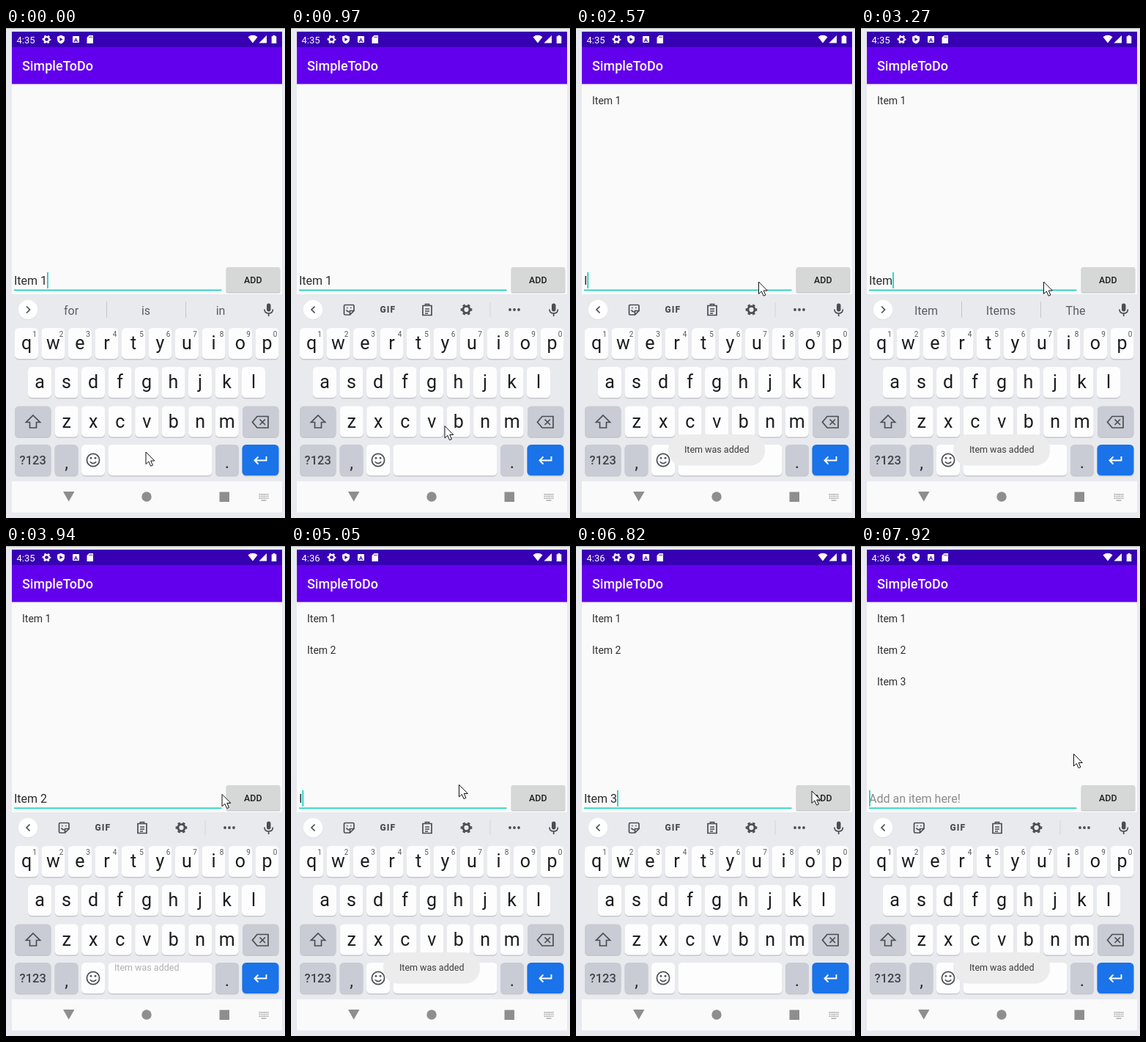
Write an HTML page that moves like this. It is 381 by 668 pixels and loops after 8000 ms.

```html
<!DOCTYPE html>
<html lang="en">
<head>
<meta charset="utf-8">
<title>To-do list demo</title>
<style>
html, body { margin: 0; width: 100%; height: 100%; overflow: hidden; background: #e8eaef; }
svg { display: block; width: 100vw; height: 100vh; }
text { font-family: Roboto, sans-serif; white-space: pre; }
.mid { text-anchor: middle; }
.line { fill: none; stroke: #4a4d51; stroke-width: 1.7; }
</style>
</head>
<body>
<svg id="stage" viewBox="0 0 381 668"></svg>
<script>
const LOOP = 8000;
const BLINK = 510;
const INK = '#4a4d51';
const stage = document.getElementById('stage');

const rect = (x, y, w, h, fill, r = 0, extra = '') =>
  `<rect x="${x}" y="${y}" width="${w}" height="${h}" rx="${r}" fill="${fill}" ${extra}/>`;
const dot = (x, y, r, fill) => `<circle cx="${x}" cy="${y}" r="${r}" fill="${fill}"/>`;
const text = (x, y, size, fill, str, extra = '') =>
  `<text x="${x}" y="${y}" font-size="${size}" fill="${fill}" ${extra}>${str}</text>`;
const path = (d, extra = 'class="line"') => `<path d="${d}" ${extra}/>`;
const at = (x, y, body, extra = '') => `<g transform="translate(${x} ${y})" ${extra}>${body}</g>`;
const fill = color => `fill="${color}"`;

const gear = (x, y, scale, color) => at(x, y,
  `<g transform="scale(${scale})" fill="none" stroke="${color}">
    <circle r="4.7" stroke-width="3"/>
    <circle r="6.9" stroke-width="2.2" pathLength="12" stroke-dasharray="1 1" stroke-dashoffset=".5"/></g>`);

function key(x, y, w, color = '#fdfdfe') {
  return rect(x, y + 1, w, 42.5, '#c6c8cd', 5.5) + rect(x, y, w, 42, color, 5.5);
}

function letterRow(letters, x, y, digits = '') {
  return [...letters].map((c, i) => {
    const cx = x + 36.5 * i;
    const digit = digits ? text(cx + 11, y + 11.5, 10, '#55585c', digits[i], 'class="mid"') : '';
    return key(cx - 16, y, 32) + text(cx, y + 29, 25, '#1c1d1f', c, 'class="mid"') + digit;
  }).join('');
}

function statusBar() {
  return rect(8, 5, 369, 21.5, '#3700b3') +
    text(14.5, 20.5, 13, '#fff', '4:35', 'id="clock"') +
    gear(55.5, 15.5, .74, '#fff') +
    at(75, 15.5, path('M0-5.8L5-3.8V0C5 3 3 5 0 6C-3 5-5 3-5 0V-3.8Z', fill('#fff')) +
      path('M-1.6-2.6L2.6 0L-1.6 2.6Z', fill('#3700b3'))) +
    rect(91, 11, 9, 9, '#fff', 1) +
    text(95.5, 18.5, 8, '#3700b3', 'A', 'class="mid" font-weight="700"') +
    path('M113.5 10H119V21H110.5V13Z', fill('#fff')) +
    path('M114 11.5v2M115.7 11.5v2M117.4 11.5v2', 'stroke="#3700b3" stroke-width=".8"') +
    path('M330.5 12.2Q337 7.5 343.5 12.2L337 20.5Z', fill('#fff')) +
    path('M356 10V20.5H345.5Z', fill('#fff')) +
    path('M364.5 10h3v1.2h1.8v9.8h-6.6v-9.8h1.8Z', fill('#fff'));
}

function appScreen() {
  return rect(8, 76, 369, 287, '#fafafa') + statusBar() +
    rect(8, 26, 369, 50.4, '#6200ee') +
    text(22, 58, 18, '#fff', 'SimpleToDo', 'font-weight="500"') +
    [1, 2, 3].map(n => text(22, 60.5 + 43 * n, 14, '#303030', 'Item ' + n, `id="item${n}"`)).join('') +
    text(11, 350, 16, '#8c8c8c', 'Add an item here!', 'id="hint"') +
    text(11, 350, 16, '#2a2a2a', '', 'id="entry"') +
    rect(11, 356.6, 283.5, 1.6, '#12cdbb') +
    rect(0, 333, 1.7, 22, '#12cfbc', 0, 'id="caret"') +
    rect(300.5, 327, 74, 34.5, '#c9caca', 2) + rect(301, 326, 73, 34, '#d6d7d7', 2, 'id="button"') +
    text(337.3, 347.5, 12.4, '#202020', 'ADD', 'class="mid" font-weight="500"');
}

function toolbar() {
  return path('M32.5 379.5L28 384L32.5 388.5') +
    path('M74 377.5h10.5q1.5 0 1.5 1.5v6.5l-5.5 5.5h-6.5q-1.5 0-1.5-1.5v-10.5q0-1.5 1.5-1.5' +
      'M86 385.5h-5.5v5.5M75.5 384.5q1.5 2.5 4 2.5M76 381.5h1.5M81 381.5h1.5') +
    text(132.3, 388.3, 12, INK, 'GIF', 'class="mid" font-weight="900" letter-spacing="1"') +
    path('M180 378.5h12v13h-12ZM183.5 378.5v-2h5v2M183 383h6M183 386h6M183 389h4') +
    gear(239.5, 384, .98, INK) +
    rect(271.5, 374, 1, 20, '#d2d4d9') +
    [299, 305, 311].map(x => dot(x, 384, 1.9, INK)).join('');
}

function suggestions() {
  return path('M28 379.5L32.5 384L28 388.5') +
    [89, 191, 293].map((x, i) => text(x, 390.5, 16, '#5a5d62', '', `class="mid" id="word${i}"`)).join('') +
    rect(137, 373, 1, 22, '#c3c6cb') + rect(245, 373, 1, 22, '#c3c6cb');
}

function keyboard() {
  const grey = '#c9ccd4';
  return rect(8, 363, 369, 255, '#e8eaee') +
    dot(30, 384.8, 13.3, '#d9dbdf') + dot(30, 384, 13.2, '#fff') +
    `<g id="tools">${toolbar()}</g><g id="words">${suggestions()}</g>` +
    rect(356, 375.5, 5.5, 11, INK, 2.75) +
    path('M353 383.5q0 5.5 5.7 5.5t5.7-5.5M358.7 389v4') +
    letterRow('qwertyuiop', 28, 409, '1234567890') +
    letterRow('asdfghjkl', 46, 462) +
    letterRow('zxcvbnm', 82.7, 515.5) +
    key(12, 515.5, 49.5, grey) + path('M37 528L46.5 537.5H41.5V545H32.5V537.5H27.5Z') +
    key(323, 515.5, 49.5, grey) +
    path('M343 529.5H358V545H343L336.5 537.2ZM346.5 533.5l7.5 7.5M354 533.5l-7.5 7.5') +
    key(12, 568, 49.5, grey) + text(36.7, 595, 16.5, '#404347', '?123', 'class="mid" font-weight="500"') +
    key(66.5, 568, 32, grey) + text(82.5, 600.5, 24, '#2b2d30', ',', 'class="mid"') +
    key(103, 568, 32) + '<circle cx="119" cy="589" r="8.6" class="line"/>' +
    dot(116, 586.3, 1.4, INK) + dot(122, 586.3, 1.4, INK) + path('M114.8 591.3q4.2 4.6 8.4 0') +
    key(139.5, 568, 142) +
    key(286, 568, 32, grey) + text(302, 600, 24, '#2b2d30', '.', 'class="mid"') +
    key(322.5, 568, 50, '#1a73e8') +
    path('M355.5 584V589.5H340M344.5 584.5L339.5 589.5L344.5 594.5', 'fill="none" stroke="#fff" stroke-width="1.9"');
}

function navBar() {
  const grey = '#8e8e8e';
  const dots = [0, 1, 2].map(r => path(`M345.5 ${635.8 + 2.6 * r}h13`,
    'stroke="#a2a2a2" stroke-width="1.4" stroke-dasharray="1.6 .7"')).join('');
  return rect(8, 618, 369, 42.5, '#fafafa') +
    path('M78 632H93.5L85.7 645.5Z', fill(grey)) + dot(192, 639, 6.7, grey) +
    rect(291.5, 632.5, 13.5, 13.5, grey) + dots + path('M348.5 644h7', 'stroke="#a2a2a2" stroke-width="1.3"');
}

stage.innerHTML = rect(0, 0, 381, 668, '#e8eaef') + rect(0, 0, 381, 1, '#b4b5b9') +
  appScreen() + keyboard() + navBar() +
  rect(126, 554, 132, 42.5, '#ececed', 20, 'id="toast"') +
  text(192.2, 579, 12.5, '#3c3c3c', 'Item was added', 'class="mid" id="label"') +
  at(0, 0, path('M0 0V16.5L3.8 13L6.6 19.2L9.4 18L6.7 12H11.8Z',
    'fill="#fff" stroke="#111" stroke-width="1" stroke-linejoin="round"'), 'id="mouse"');

const ui = {};
stage.querySelectorAll('[id]').forEach(el => ui[el.id] = el);

// Each round types "Item n" from start to done, then clicks ADD.
const rounds = [
  { start: -2000, done: 0, click: 1540 },
  { start: 2570, done: 3420, click: 4300 },
  { start: 5050, done: 5720, click: 6900 }
];
const moves = [
  { from: 900, to: 1390, x: 322, y: 333 },
  { from: 1700, to: 2050, x: 249.5, y: 346 },
  { from: 3740, to: 4060, x: 322, y: 334 },
  { from: 4460, to: 4660, x: 229.5, y: 325.5 },
  { from: 6470, to: 6790, x: 322, y: 334 },
  { from: 7010, to: 7240, x: 309, y: 291 },
  { from: 7740, to: 7920, x: 290.5, y: 283.5 }
];

const clamp = v => Math.min(1, Math.max(0, v));
const show = (el, opacity) => el.setAttribute('opacity', +opacity);

// The first letter is followed by a short pause, the others come evenly.
function lettersTyped({ start, done }, t) {
  const pause = 130;
  const step = (done - start - pause) / 5;
  return 1 + Math.floor(5 * clamp((t - start - pause) / (5 * step)));
}

function suggest(entry) {
  return /\s/.test(entry) ? ['for', 'is', 'in'] : [entry, entry + 's', 'The'];
}

function drawInput(t) {
  const n = rounds.findLastIndex(r => t >= r.start);
  const round = rounds[n];
  const count = lettersTyped(round, t);
  const entry = t < round.click ? `Item ${n + 1}`.slice(0, count) : '';
  const lastEdit = t >= round.click ? round.click : Math.min(t, round.done);
  const suggesting = count > 1 && t < round.done + 280;

  ui.entry.textContent = entry;
  show(ui.hint, !entry);
  show(ui.caret, Math.floor((t - lastEdit) / BLINK) % 2 === 0);
  ui.caret.setAttribute('x', 11 + (entry ? ui.entry.getComputedTextLength() : 0));
  show(ui.tools, !suggesting);
  show(ui.words, suggesting);
  suggest(entry).forEach((word, i) => ui['word' + i].textContent = word);
}

function drawResult(t) {
  rounds.forEach(({ click }, i) => show(ui['item' + (i + 1)], clamp((t - click - 115) / 110)));
  const pressed = rounds.some(({ click }) => t >= click && t < click + 240);
  ui.button.setAttribute('fill', pressed ? '#b5b8b7' : '#d6d7d7');

  const last = rounds.findLast(({ click }) => t >= click + 240);
  const age = last ? t - last.click - 240 : 0;
  show(ui.toast, clamp(Math.min(age / 300, (2130 - age) / 140)));
  show(ui.label, clamp(Math.min(age / 390, (2280 - age) / 300)));
}

function drawMouse(t) {
  let x = 191, y = 578;
  for (const m of moves) {
    const k = clamp((t - m.from) / (m.to - m.from));
    x += (m.x - x) * k;
    y += (m.y - y) * k;
  }
  ui.mouse.setAttribute('transform', `translate(${x} ${y})`);
}

function render(t) {
  ui.clock.textContent = t < 4780 ? '4:35' : '4:36';
  drawInput(t);
  drawResult(t);
  drawMouse(t);
}

const began = performance.now();
function tick() {
  render((performance.now() - began) % LOOP);
  requestAnimationFrame(tick);
}
tick();
</script>
</body>
</html>
```
